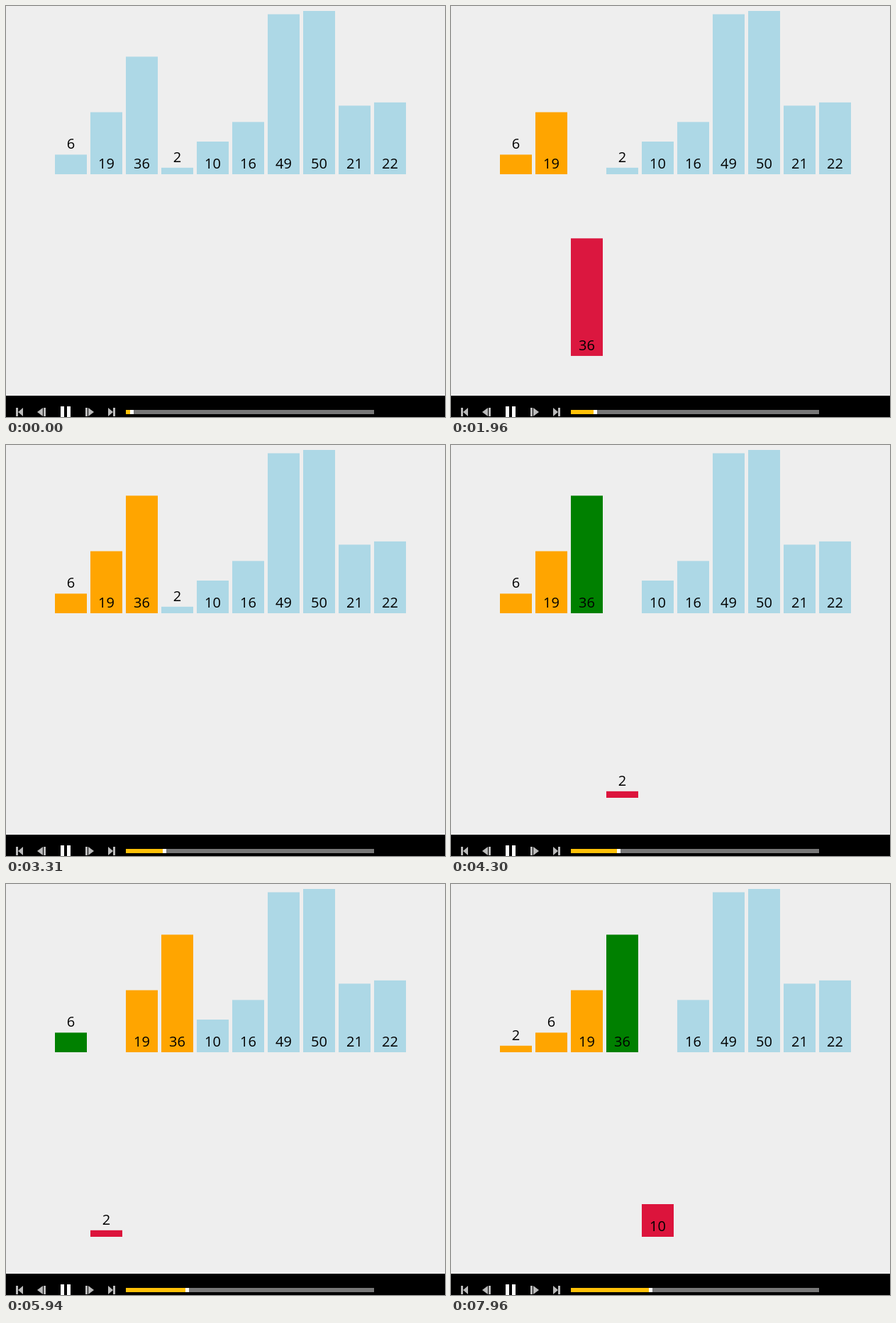
Animation of 619x579 px, one loop 8000 ms. Source, as an HTML page with a canvas:

```html
<!DOCTYPE html>
<html lang="en">
<head>
<meta charset="utf-8">
<title>Insertion sort</title>
<style>
  html, body { margin: 0; width: 100%; height: 100%; overflow: hidden; background: #eee; }
  canvas { display: block; }
</style>
</head>
<body>
<canvas id="stage" width="619" height="579"></canvas>
<script>
const ctx = document.getElementById('stage').getContext('2d');
const LOOP = 8000, BASE = 237, DROP = 260, UNIT = 4.6;

const BLUE = [173, 216, 230], ORANGE = [255, 165, 0];
const GREEN = [0, 128, 0], RED = [220, 20, 60];

const sorted = { color: ORANGE }, compared = { color: GREEN };
const lowered = { color: RED, down: 1 }, raised = { color: ORANGE, down: 0 };
const at = slot => ({ slot });

// [slider time, first change, last change, number of changes, { value: new state }]
const steps = [
  [0, 70, 160, 3, { 6: sorted }],
  [310, 310, 630, 5, { 19: lowered }],
  [710, 870, 1020, 3, { 6: compared }],
  [1250, 1250, 1570, 5, { 6: sorted, 19: raised }],
  [1720, 1720, 2040, 5, { 36: lowered }],
  [2270, 2270, 2510, 4, { 19: compared }],
  [2740, 2740, 3050, 5, { 19: sorted, 36: raised }],
  [3310, 3310, 3540, 4, { 2: lowered }],
  [3770, 3770, 4070, 5, { 36: compared }],
  [4300, 4300, 4530, 4, { 36: at(3), 2: at(2) }],
  [4760, 4760, 5000, 4, { 36: sorted, 19: compared }],
  [5230, 5230, 5550, 5, { 19: at(2), 2: at(1) }],
  [5700, 5870, 5940, 2, { 19: sorted, 6: compared }],
  [6320, 6320, 6490, 3, { 6: at(1), 2: at(0) }],
  [6790, 6790, 7030, 4, { 6: sorted, 2: raised }],
  [7260, 7260, 7580, 5, { 10: lowered }],
  [7720, 7720, 7960, 4, { 36: compared }]
];

const mix = (a, b, p) => a + (b - a) * p;
const cubicInOut = u => u < .5 ? 4 * u ** 3 : 1 - 4 * (1 - u) ** 3;

// Eased progress of a step; the picture refreshes only at its evenly spaced changes.
function progress(t, first, last, count) {
  if (t < first) return 0;
  const gap = (last - first) / (count - 1);
  const k = Math.floor((t - first) / gap + 1e-6);
  if (k >= count - 1) return 1;
  const start = count < 4 ? first - 60 : first + 10;
  const end = Math.min(last, start + 273);
  const u = (first + k * gap - start) / (end - start);
  return cubicInOut(Math.min(1, Math.max(0, u)));
}

function barsAt(t) {
  const bars = [6, 19, 36, 2, 10, 16, 49, 50, 21, 22]
    .map((value, slot) => ({ value, slot, down: 0, color: BLUE }));
  for (const [, first, last, count, changes] of steps) {
    const p = progress(t, first, last, count);
    if (!p) continue;
    for (const bar of bars) {
      const next = { ...bar, ...changes[bar.value] };
      bar.slot = mix(bar.slot, next.slot, p);
      bar.down = mix(bar.down, next.down, p);
      bar.color = bar.color.map((c, i) => mix(c, next.color[i], p));
    }
  }
  return bars;
}

function rect(x, y, w, h, fill) {
  ctx.fillStyle = fill;
  ctx.fillRect(x, y, w, h);
}

function triangle(tip, back) {
  ctx.beginPath();
  ctx.moveTo(tip, 572);
  ctx.lineTo(back, 566);
  ctx.lineTo(back, 578);
  ctx.fill();
}

function drawBar({ value, slot, down, color }) {
  const x = 69 + 50 * slot, bottom = BASE + DROP * down, h = value * UNIT;
  rect(x, bottom - h, 45, h, `rgb(${color.map(Math.round)})`);
  ctx.fillStyle = '#000';
  ctx.fillText(value, x + 22.5, (value < 10 ? bottom - h : bottom) - 8);
}

function drawControls(t) {
  rect(0, 549, 619, 30, '#000');
  // [bar x, triangle tip, triangle back]
  for (const [x, tip, back] of [[14, 17, 24], [53, 44, 52], [112, 124, 116], [151, 151, 144]]) {
    rect(x, 566, 3, 12, '#bbb');
    triangle(tip, back);
  }
  rect(77, 564, 5, 15, '#fff');
  rect(86, 564, 5, 15, '#fff');

  const done = steps.filter(step => step[0] <= t).length;
  const knob = Math.floor(169 + 6.5 * done);
  rect(169, 569, 350, 6, '#777');
  rect(169, 569, knob - 169, 6, '#ffc107');
  rect(knob, 569, 5, 6, '#fff');
}

function draw(t) {
  rect(0, 0, 619, 579, '#eee');
  ctx.font = '20px "Open Sans", "Noto Sans", sans-serif';
  ctx.textAlign = 'center';
  barsAt(t).forEach(drawBar);
  drawControls(t);
}

const begin = performance.now();
function tick() {
  draw((performance.now() - begin) % LOOP);
  requestAnimationFrame(tick);
}
tick();
</script>
</body>
</html>
```
